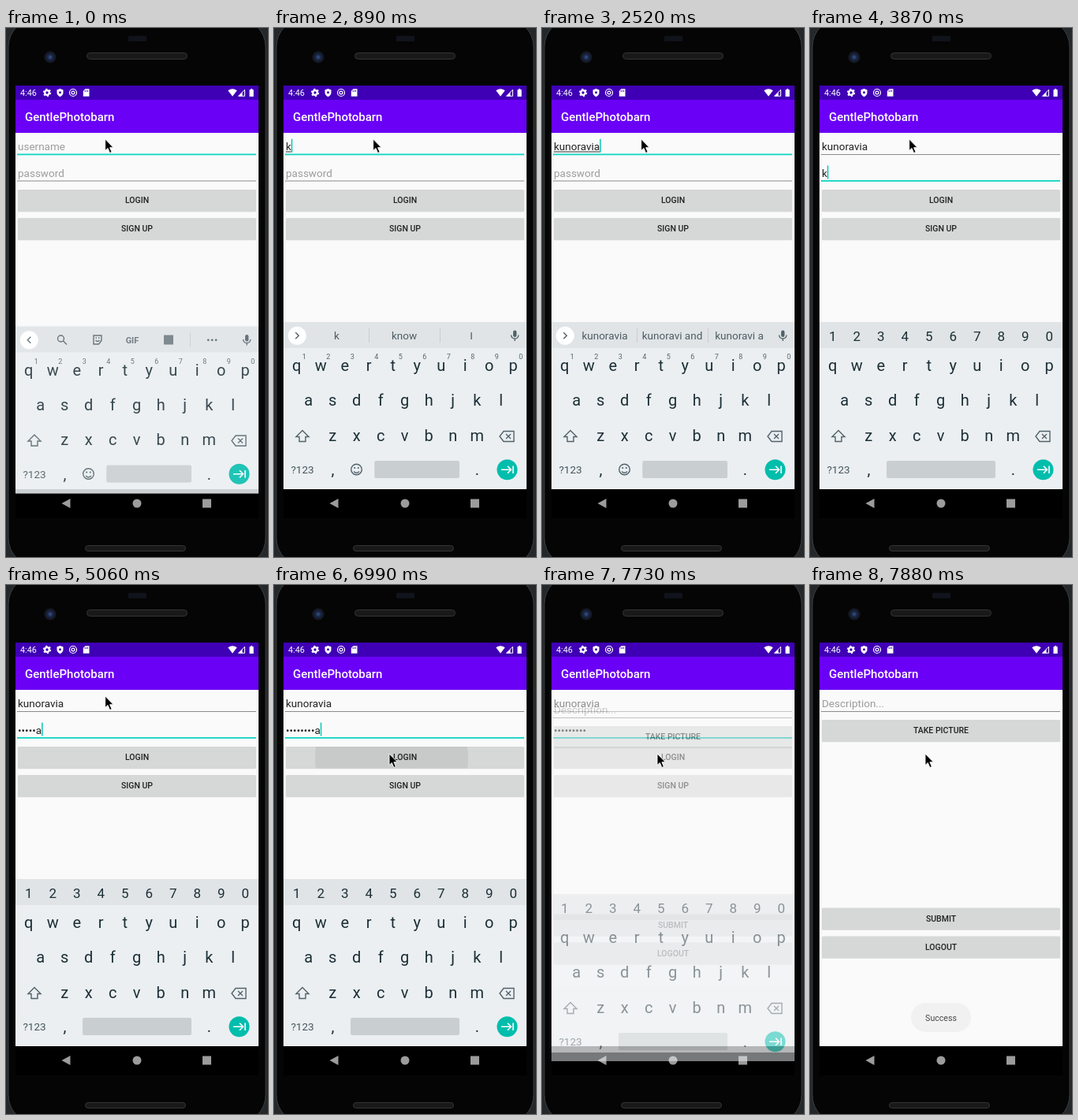
An HTML page that plays this animation: 332x671 px, repeating every 8000 ms.

```html
<!DOCTYPE html>
<html lang="en">
<head>
<meta charset="utf-8">
<title>Login flow</title>
<style>
  html, body { margin: 0; width: 100%; height: 100%; overflow: hidden; background: #25282a; }
  svg { display: block; width: 332px; height: 671px; font-family: Roboto, sans-serif; }
  .mid { text-anchor: middle; }
  .field { font-size: 13.5px; fill: #212121; }
  .hint { font-size: 13.5px; fill: #9c9c9c; }
  .label { font-size: 10.5px; font-weight: 500; fill: #212121; text-anchor: middle; }
  .key { font-size: 20px; fill: #1c2f36; text-anchor: middle; }
  .digit { font-size: 17px; fill: #1c2f36; text-anchor: middle; }
  .sup { font-size: 9px; fill: #56666d; text-anchor: middle; }
  .word { font-size: 13.5px; fill: #4d5c63; text-anchor: middle; }
  .line { fill: none; stroke: #52626a; stroke-width: 1.4; }
</style>
</head>
<body>
<svg viewBox="0 0 332 671" xml:space="preserve">
  <defs>
    <clipPath id="loginClip"><rect x="15" y="205" width="302" height="27.5" rx="1.5"/></clipPath>
    <radialGradient id="lens">
      <stop offset="0" stop-color="#3a558c"/>
      <stop offset=".45" stop-color="#1b2848"/>
      <stop offset="1" stop-color="#10131d"/>
    </radialGradient>
  </defs>

  <!-- phone body -->
  <rect x="3" y="-12" width="326" height="695" rx="36" fill="#050505" stroke="#3b3e40"/>
  <rect x="155" y="10" width="23" height="7" rx="1" fill="#10131b"/>
  <circle cx="56" cy="37" r="7" fill="url(#lens)" stroke="#191c24"/>
  <rect x="102.5" y="31.5" width="127" height="8" rx="4" fill="#191919" stroke="#343434"/>
  <rect x="100.500" y="656.5" width="127" height="7" rx="3.5" fill="#191919" stroke="#343434"/>

  <!-- navigation -->
  <rect x="12" y="585" width="308" height="37" fill="#000"/>
  <g fill="#9c9c9c">
    <path d="M70.500 603L81.500 597V609Z"/>
    <circle cx="166" cy="603" r="5.5"/>
    <rect x="249" y="597.5" width="11" height="11"/>
  </g>

  <!-- app -->
  <rect x="12" y="133" width="308" height="452" fill="#fafafa"/>
  <g id="login"></g>
  <g id="post"></g>
  <rect x="12" y="91" width="308" height="42" fill="#6a00f5"/>
  <rect x="12" y="73" width="308" height="18" fill="#3f00b5"/>
  <text x="24" y="118" font-size="15" font-weight="500" fill="#fff">GentlePhotobarn</text>

  <!-- status icons -->
  <g fill="#fff">
    <text x="18" y="86.200" font-size="10.8">4:46</text>
    <circle cx="52" cy="82" r="2.8" fill="none" stroke="#fff" stroke-width="2.2"/>
    <circle cx="52" cy="82" r="4.400" fill="none" stroke="#fff" stroke-width="1.6" stroke-dasharray="2.2 2.408"/>
    <path d="M68.500 77L72.500 78.500V82Q72.300 85.500 68.500 87.200Q64.700 85.500 64.500 82V78.500Z"/>
    <circle cx="68.500" cy="81.800" r="1.500" fill="#3f00b5"/>
    <circle cx="85" cy="82" r="4.500" fill="none" stroke="#fff" stroke-width="1.2"/>
    <circle cx="85" cy="82" r="1.900" fill="none" stroke="#fff" stroke-width="1.2"/>
    <path d="M100.500 77.300H105.500V86.800H97.800V80Z"/>
    <path d="M99.900 79.200v1.800M101.700 78.700v2.300M103.500 78.700v2.300" stroke="#3f00b5" stroke-width=".8"/>
    <path d="M281.300 79.300Q287 75.200 292.700 79.300L287 86.700Z"/>
    <path d="M294.500 86.300L302.500 78.300V86.300Z" fill="none" stroke="#fff"/>
    <path d="M294.500 86.500L299.500 81.500V86.500Z"/>
    <path d="M308.500 78.200H310V77H312.200V78.200H313.700V87H308.500Z"/>
  </g>

  <g id="keyboard"></g>
  <g id="toast">
    <rect x="128" y="530" width="76" height="37" rx="18.500" fill="#f1f1f1"/>
    <text class="mid" x="166" y="553" font-size="10.600" fill="#484848">Success</text>
  </g>
  <path id="pointer" d="M0 0V14.500L3.300 11.500L5.900 17.500L8.400 16.400L5.900 10.700H10.400Z" fill="#000" stroke="#fff" stroke-width=".9"/>
</svg>

<script>
const LOOP = 8000;
const NAME = 'kunoravia';
const TEAL = '#12d5c3';
const $ = id => document.getElementById(id);

const button = (y, label, inner = '') =>
  `<rect x="15" y="${y + .8}" width="302" height="27.500" rx="1.500" opacity=".14"/>
   <rect x="15" y="${y}" width="302" height="27.500" rx="1.500" fill="#d6d7d7"/>${inner}
   <text class="label" x="166" y="${y + 17.3}">${label}</text>`;

const rule = (id, y) => `<rect id="${id}" x="14" y="${y}" width="303" height="1" fill="#8c8c8c"/>`;

$('login').innerHTML =
  `<text id="userHint" class="hint" x="15" y="154.800">username</text>
   <text id="passHint" class="hint" x="15" y="188.500">password</text>
   <text id="user" class="field" x="15" y="154.800"></text>
   <text id="pass" class="field" x="15" y="188.500"></text>
   <rect id="composing" x="15" y="156.500" height="1" fill="#333"/>
   ${rule('userRule', 160)}${rule('passRule', 193.5)}
   <rect id="caret" width="1.500" height="17" fill="#08c9b7"/>` +
  button(205, 'LOGIN', '<circle id="ripple" cx="149" cy="219" clip-path="url(#loginClip)"/>') +
  button(241, 'SIGN UP');

$('post').innerHTML =
  `<rect x="12" y="133" width="308" height="452" fill="#fafafa"/>
   <text class="hint" x="15" y="154.800">Description...</text>` +
  rule('noteRule', 160) + button(171, 'TAKE PICTURE') + button(409.5, 'SUBMIT') + button(445.5, 'LOGOUT');

const row = (chars, x, y, cls = 'key') =>
  [...chars].map((c, i) => `<text class="${cls}" x="${x + i * 30.5}" y="${y}">${c}</text>`).join('');

const chevron = dir =>
  `<circle cx="29.300" cy="390.300" r="11.500" fill="#fff"/>
   <path class="line" d="M${29.3 - dir * 2} 386.300l${dir * 4} 4l${-dir * 4} 4"/>`;

const divider = x => `<path d="M${x} 381v18" stroke="#c8cdd0"/>`;

$('keyboard').innerHTML =
  `<rect x="12" y="373" width="308" height="212" fill="#ebeff2"/>
   <rect x="12" y="373" width="308" height="33" fill="#e0e4e7"/>` +
  row('qwertyuiop', 28.7, 435) + row('asdfghjkl', 43.7, 479) + row('zxcvbnm', 74.2, 523.5) +
  `<path class="line" d="M36 510.500L44 518.500H40V524.500H32V518.500H28Z"/>
   <path class="line" d="M291 511.500H304V524.500H291L286 518Z M294 515l6 6m0-6l-6 6"/>
   <text class="mid" x="36" y="565" font-size="13.500" fill="#44555c">?123</text>
   <text class="key" x="74.500" y="567">,</text>
   <text class="key" x="257.500" y="567">.</text>
   <rect id="space" y="549" height="22" rx="2" fill="#c9ced1"/>
   <circle cx="295.500" cy="560.300" r="13" fill="#00bdac"/>
   <path d="M288 560.300H300M296 555.800l4.500 4.500l-4.500 4.500M303 555.500v9.600" fill="none" stroke="#fff" stroke-width="1.600"/>
   <g id="textKeys">${row('1234567890', 38.2, 420, 'sup')}
     <circle class="line" cx="104.500" cy="560" r="6.800"/>
     <path class="line" d="M101 562.500Q104.500 566 108 562.500"/>
     <circle cx="102.200" cy="558" r="1.100" fill="#52626a"/><circle cx="106.800" cy="558" r="1.100" fill="#52626a"/>
     <rect x="303" y="383.500" width="4.400" height="8.500" rx="2.200" fill="#52626a"/>
     <path class="line" d="M300.500 389.500Q301 394 305.200 394T309.900 389.500M305.200 394v3"/>
   </g>
   <g id="digits">${row('1234567890', 28.7, 396.5, 'digit')}</g>
   <g id="tools">${chevron(-1)}
     <circle class="line" cx="69.500" cy="388.500" r="4"/><path class="line" d="M72.500 391.500l4.500 4.500"/>
     <path class="line" d="M111 384.500H121V391L117.500 395.500H111Z M113.500 390.500Q116 393.500 118.500 390.500M113.500 387.500h1.500M117 387.500h1.500"/>
     <text class="mid" x="160" y="394.200" font-size="11" font-weight="700" fill="#5f6f76">GIF</text>
     <rect x="200" y="384" width="12" height="12" fill="#6c7a81"/>
     ${divider(233.5)}
     <g fill="#52626a"><circle cx="256.300" cy="390.300" r="1.400"/><circle cx="261.200" cy="390.300" r="1.400"/><circle cx="266.100" cy="390.300" r="1.400"/></g>
   </g>
   <g id="words">${chevron(1)}${divider(120.5)}${divider(210.5)}
     ${[79.5, 165, 250].map(x => `<text class="word" x="${x}" y="395.200"></text>`).join('')}
   </g>`;

// Value of the last step [time, value] that has begun.
const at = (steps, t) => steps.reduce((v, s) => t >= s[0] ? s[1] : v, steps[0][1]);

const userCount = [[0, 0], [740, 1], [1040, 2], [1190, 3], [1490, 4], [1780, 6], [2230, 7], [2370, 8], [2520, 9]];
const passCount = [[0, 0], [3870, 1], [4020, 2], [4320, 3], [4620, 4], [4910, 5], [5060, 6], [5510, 7], [5660, 8], [5950, 9]];
const caretOn = [[0, 0], [440, 1], [3420, 0], [3870, 1], [6400, 0], [6840, 1], [7280, 0]];
const pointerAt = [[0, [125.7, 141]], [6400, [131, 157]], [6550, [140, 187]], [6690, [145, 208]], [6840, [146, 214]]];
const rippleAt = [[0, [0, 0]], [6990, [97, .065]], [7130, [180, .065]], [7280, [180, .045]], [7580, [180, .02]]];
const boardAt = [[0, [5.5, .87]], [150, [0, 1]], [7730, [19, .5]], [7880, [0, 0]]];
const postAt = [[0, [0, 0]], [7730, [8, .5]], [7880, [0, 1]]];

const show = (id, on) => $(id).style.display = on ? '' : 'none';
const set = (id, attrs) => { for (const k in attrs) $(id).setAttribute(k, attrs[k]); };
const place = (id, [y, opacity]) => {
  show(id, opacity > 0);
  set(id, { transform: `translate(0 ${y})`, opacity });
};

function suggest(n) {
  if (n < 2) return ['k', 'know', 'I'];
  const part = NAME.slice(0, n);
  if (n < 4) return [part, part + 'w', part + 't'];
  const stem = n > 8 ? NAME.slice(0, 8) : part;
  return [part, stem + ' and', stem + ' a'];
}

function underline(id, y, focused) {
  set(id, { y: focused ? y - .5 : y, height: focused ? 1.8 : 1, fill: focused ? TEAL : '#8c8c8c' });
}

function draw(t) {
  const inPass = t >= 2970;
  const n = at(userCount, t), p = at(passCount, t);
  const masked = t >= 7280 ? p : Math.max(p - 1, 0);

  $('user').textContent = NAME.slice(0, n);
  $('pass').textContent = '•'.repeat(masked) + NAME.slice(masked, p);
  show('userHint', !n);
  show('passHint', !p);
  show('composing', n && !inPass);
  const active = $(inPass ? 'pass' : 'user');
  const width = active.textContent ? active.getComputedTextLength() : 0;
  if (!inPass) set('composing', { width });
  set('caret', { x: 15 + width, y: inPass ? 174.5 : 140.8, opacity: at(caretOn, t) });
  underline('userRule', 160, !inPass);
  underline('passRule', 193.5, inPass);

  show('digits', inPass);
  show('textKeys', !inPass);
  show('tools', t < 890);
  show('words', t >= 890 && !inPass);
  const words = suggest(n);
  document.querySelectorAll('.word').forEach((el, i) => el.textContent = words[i]);
  const left = inPass ? 97 : 127.3;
  set('space', { x: left, width: 235 - left });

  const [r, opacity] = at(rippleAt, t);
  set('ripple', { r, opacity });
  set('pointer', { transform: `translate(${at(pointerAt, t)})` });
  place('keyboard', at(boardAt, t));
  place('post', at(postAt, t));
  place('toast', [0, t >= 7880 ? 1 : 0]);
}

const start = performance.now();
function tick() {
  draw((performance.now() - start) % LOOP);
  requestAnimationFrame(tick);
}
tick();
</script>
</body>
</html>
```
